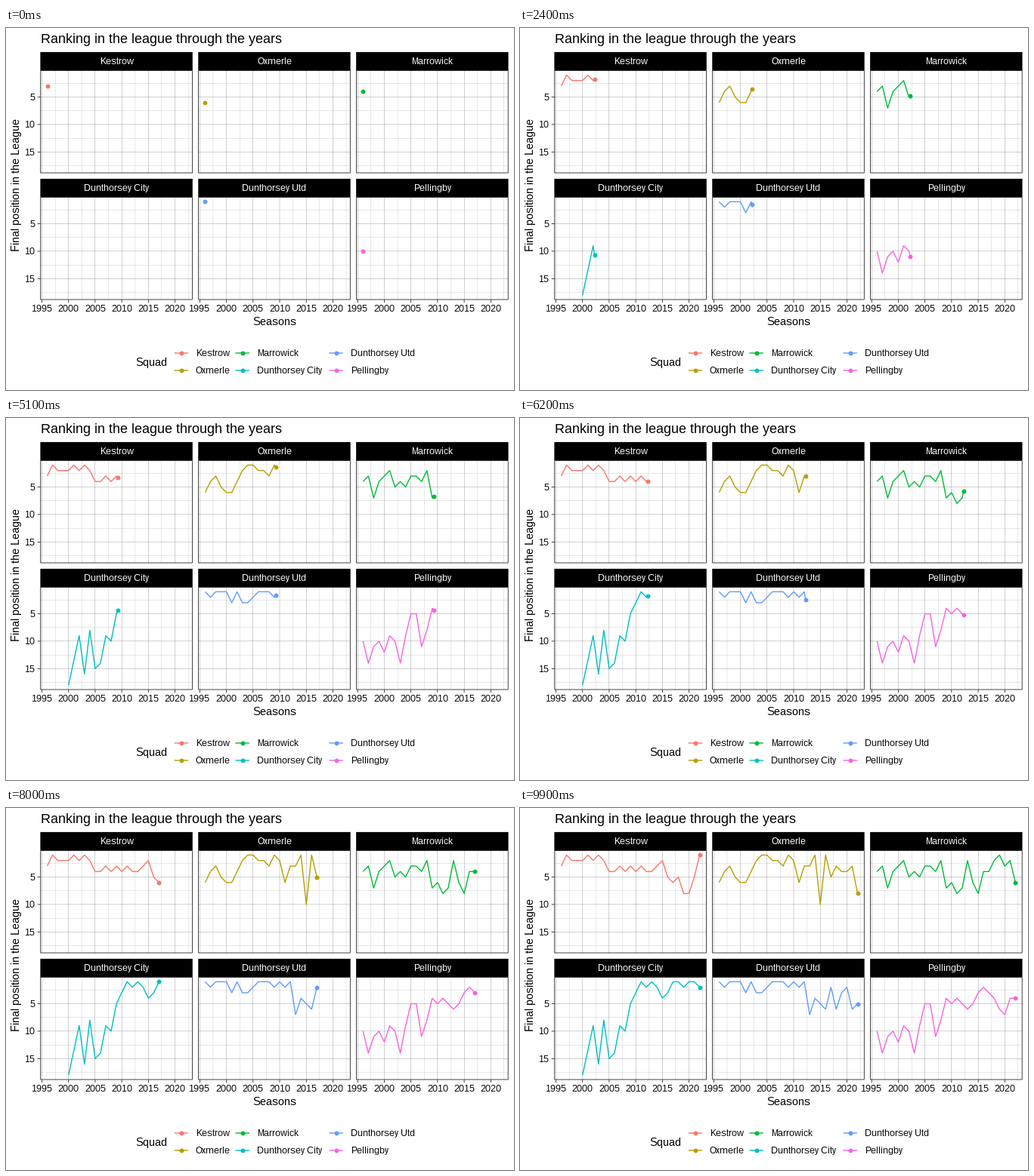
A matplotlib script for the animation above (10 s loop, 672 by 480 pixels).

```python
import matplotlib.pyplot as plt
import numpy as np
from matplotlib.animation import FuncAnimation
from matplotlib.patches import Rectangle

W, H = 672, 480
FRAMES = 100
FIRST, LAST = 1996, 2022

LEFTS = [45.39, 254.26, 463.13]
TOPS = [56.2, 224.2]
PANEL_W, PANEL_H, STRIP_H = 201.4, 136.2, 24.3
LINE, DOT = 1.4, 5.9

plt.rcParams.update({
    "font.family": "Liberation Sans",
    "text.hinting": "default",
    "text.hinting_factor": 1,
})

fig = plt.figure(figsize=(W / 72, H / 72), dpi=72, facecolor="white")
ax = fig.add_axes([0, 0, 1, 1])
ax.set_xlim(0, W)
ax.set_ylim(H, 0)
ax.axis("off")


def year_x(year, col):
    pad = 0.05 * (LAST - FIRST)
    return LEFTS[col] + (np.asarray(year) - FIRST + pad) / (LAST - FIRST + 2 * pad) * PANEL_W


def rank_y(rank, row):
    return TOPS[row] + (np.asarray(rank) - 0.15) / 18.7 * PANEL_H


def label(x, y, text, size=12, color="black", ha="center", **kw):
    ax.text(x, y, text, size=size, color=color, ha=ha, va="baseline", **kw)


def stroke(xs, ys, width, color="black", z=1):
    line, = ax.plot(xs, ys, color=color, lw=width, solid_capstyle="butt",
                    snap=False, zorder=z)
    return line


def dot(xs, ys, color):
    mark, = ax.plot(xs, ys, "o", color=color, ms=DOT, mew=0, snap=False, zorder=5)
    return mark


def draw_panel(col, row, name):
    x0, y0 = LEFTS[col], TOPS[row]
    x1, y1 = x0 + PANEL_W, y0 + PANEL_H
    for width, years, ranks in (
        (0.09, np.arange(1997.5, 2023, 5), np.arange(2.5, 18, 5)),
        (0.18, range(1995, 2021, 5), (5, 10, 15)),
    ):
        for r in ranks:
            y = float(rank_y(r, row))
            stroke([x0, x1], [y, y], width)
        for t in years:
            x = float(year_x(t, col))
            stroke([x, x], [y0, y1], width)
    inset = 0.365
    ax.add_patch(Rectangle((x0 + inset, y0 + inset), PANEL_W - 2 * inset,
                           PANEL_H - 2 * inset, fill=False, ec="black",
                           lw=2 * inset, snap=False, zorder=6))
    ax.add_patch(Rectangle((x0, y0 - STRIP_H), PANEL_W, STRIP_H, fc="black",
                           lw=0, snap=False, zorder=6))
    label((x0 + x1) / 2, y0 - 8, name, color="white", zorder=7)

    if col == 0:
        for r in (5, 10, 15):
            y = float(rank_y(r, row))
            stroke([x0 - 3.75, x0], [y, y], 0.73)
            label(39, y + 4.4, r, ha="right")
    if row == 1:
        for t in range(1995, 2021, 5):
            x = float(year_x(t, col))
            stroke([x, x], [y1, y1 + 3.75], 0.73)
            label(x, 376, t)


def draw_key(col, row, name, color):
    x, y = (231.9, 312.7, 436.7)[col], 431 + 23 * row
    stroke([x - 9.2, x + 9.2], [y, y], LINE, color)
    dot([x], [y], color)
    label(x + 19, y + 4, name, ha="left")


class Squad:
    """One facet: a trail that grows behind a moving dot."""

    def __init__(self, index, name, color, ranks, years=range(FIRST, LAST + 1)):
        self.row, self.col = divmod(index, 3)
        self.years, self.ranks = np.array(years), np.array(ranks)
        # each season lands on a whole animation step
        self.steps = np.round((FRAMES - 1) * (self.years - FIRST) / (LAST - FIRST))
        draw_panel(self.col, self.row, name)
        draw_key(index // 2, index % 2, name, color)
        self.trail = stroke([], [], LINE, color, z=4)
        self.head = dot([], [], color)

    def show(self, k):
        if k < self.steps[0]:
            self.trail.set_data([], [])
            self.head.set_data([], [])
            return
        past = self.steps < k
        t = np.append(self.years[past], np.interp(k, self.steps, self.years))
        r = np.append(self.ranks[past], np.interp(k, self.steps, self.ranks))
        x, y = year_x(t, self.col), rank_y(r, self.row)
        self.trail.set_data(x, y)
        self.head.set_data(x[-1:], y[-1:])


squads = []


def add(name, color, *data):
    squads.append(Squad(len(squads), name, color, *data))


add("Kestrow", "#F8766D",
    [3, 1, 2, 2, 2, 1, 2, 1, 2, 4, 4, 3, 4, 3, 4, 3, 4, 4, 3, 2, 5, 6, 5, 8, 8, 5, 1])
add("Oxmerle", "#B79F00",
    [6, 4, 3, 5, 6, 6, 4, 2, 1, 1, 2, 2, 3, 1, 2, 6, 3, 3, 1, 10, 1, 5, 3, 4, 4, 3, 8])
add("Marrowick", "#00BA38",
    [4, 3, 7, 4, 3, 2, 5, 4, 5, 3, 3, 4, 2, 7, 6, 8, 7, 2, 6, 8, 4, 4, 2, 1, 3, 2, 6])
add("Dunthorsey City", "#00BFC4",
    [18, 9, 16, 8, 15, 14, 9, 10, 5, 3, 1, 2, 1, 2, 4, 3, 1, 1, 2, 1, 1, 2],
    [2000, *range(2002, LAST + 1)])
add("Dunthorsey Utd", "#619CFF",
    [1, 2, 1, 1, 1, 3, 1, 3, 3, 2, 1, 1, 1, 2, 1, 2, 1, 7, 4, 5, 6, 2, 6, 3, 2, 6, 5])
add("Pellingby", "#F564E3",
    [10, 14, 11, 10, 12, 9, 10, 14, 9, 5, 5, 11, 8, 4, 5, 4, 5, 6, 5, 3, 2, 3, 4, 6, 7, 4, 4])

label(46, 20, "Ranking in the league through the years", 18, ha="left")
label(355, 394, "Seasons", 15)
label(18, 208, "Final position in the League", 15, rotation=90, rotation_mode="anchor")
label(171, 448, "Squad", 15, ha="left")


def update(k):
    for squad in squads:
        squad.show(k)
    return []


anim = FuncAnimation(fig, update, frames=FRAMES, interval=100, repeat=True,
                     repeat_delay=0, blit=False)
plt.show()
```
